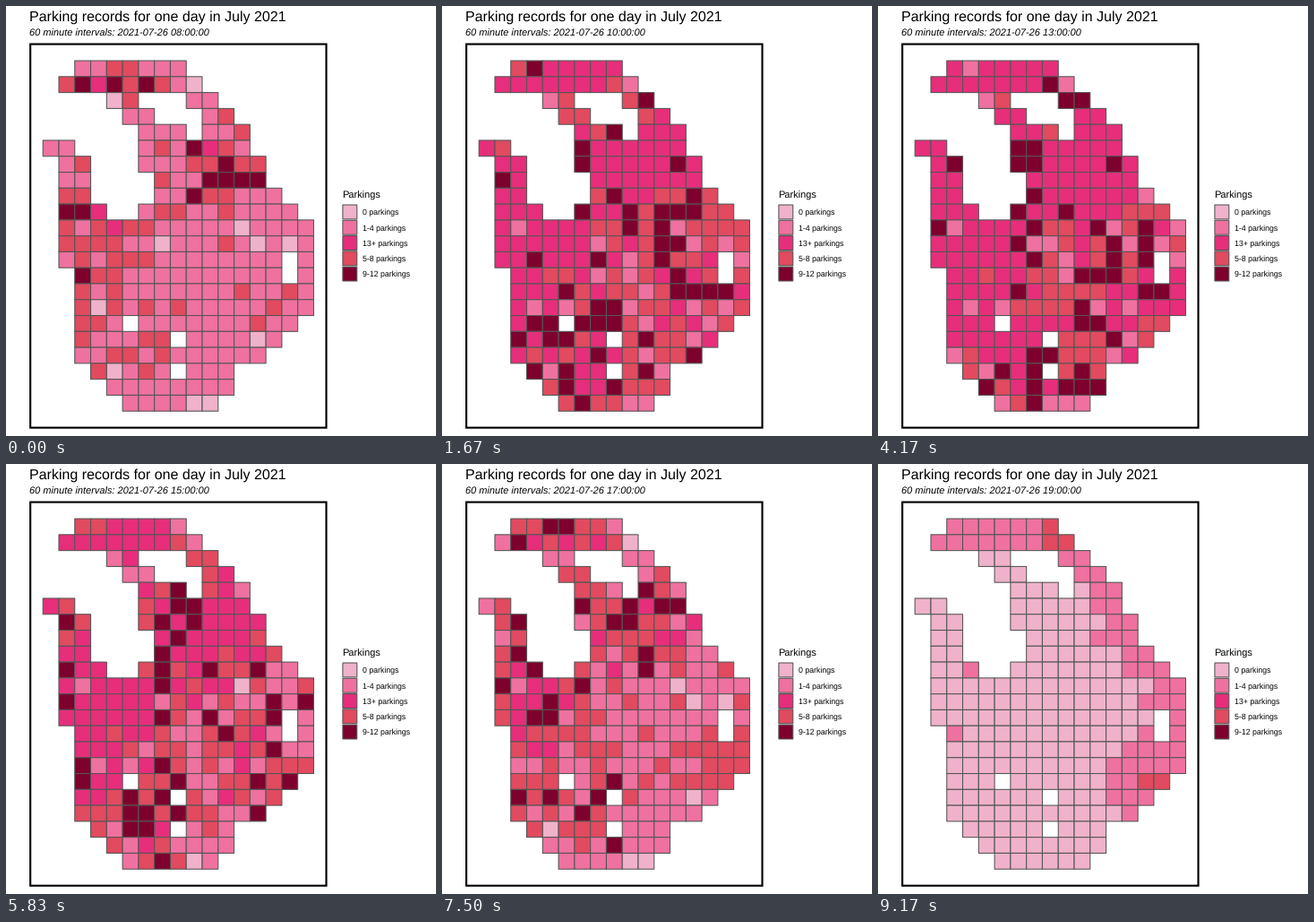
A matplotlib script for the animation above (10000 ms loop, 480x480 px).

```python
import numpy as np
import matplotlib.pyplot as plt
from matplotlib.animation import FuncAnimation
from matplotlib.collections import PatchCollection
from matplotlib.patches import Rectangle

plt.rcParams["font.family"] = ["Liberation Sans"]
plt.rcParams["text.hinting"] = "none"

SIZE, DPI = 480, 100
PX = 72 / DPI
LOOP_MS, TICK_MS = 10000, 25
TICKS = LOOP_MS // TICK_MS
FIRST_HOUR, HOURS = 8, 12

PANEL_X, PANEL_Y, PITCH = 26.1, 41.5, 17.78
COLS, ROWS, MARGIN = 17, 22, 0.05
PANEL_W = COLS * PITCH * (1 + 2 * MARGIN)
PANEL_H = ROWS * PITCH * (1 + 2 * MARGIN)
GRID_LINE, GRID_WIDTH = "#555555", 1.07

COLORS = {
    "0": "#efb2ca",
    "1-4": "#ef719f",
    "13+": "#e62e7b",
    "5-8": "#e14a5f",
    "9-12": "#7d002d",
}
BINS = ["0", "1-4", "5-8", "9-12", "13+"]
LIMITS = [0.5, 4.5, 8.5, 12.5]

LAKES = {(15, 12), (15, 13), (5, 16), (8, 17), (8, 19)}
# Busy areas: column, row, width, height, extra cars.
HOTSPOTS = [(4, 0.5, 3.5, 1.5, 24), (10, 6, 3.5, 3, 23), (2.5, 11, 3.5, 6, 26),
            (13.5, 15, 2.5, 4, 9), (6, 18, 2.5, 3, 9)]


def bump(c, r, center, row, width, height):
    return np.exp(-((c - center) / width) ** 2 - ((r - row) / height) ** 2)


def west_edge(r):
    return np.interp(r, [0, 1, 2, 4, 5, 6, 12, 13, 18, 21],
                     [2, 1, 4, 6, 0, 1, 1, 2, 2, 5])


def east_edge(r):
    return np.round(np.interp(r, [0, 4, 7, 10, 15, 19, 21],
                              [8, 12, 13, 16, 16, 11.4, 10]))


def is_land(c, r):
    channel = ((c - r - 5) / 1.3) ** 2 + ((r - 2.8) / 1.7) ** 2 < 1
    bay_center = min(4.5, 1 + r / 2)
    bay = ((c - bay_center) / 1.8) ** 2 + ((r - 6.5) / 2.9) ** 2 < 1
    inside = west_edge(r) <= c <= east_edge(r)
    return inside and not (channel or bay or (c, r) in LAKES)


cells = np.array([(c, r) for r in range(ROWS) for c in range(COLS) if is_land(c, r)])
cols, rows = cells.T

rng = np.random.default_rng(26)
day = 5 + sum(cars * bump(cols, rows, *area) for *area, cars in HOTSPOTS)
day *= np.exp(rng.normal(0, 0.25, len(cells)))
day[rng.random(len(cells)) < 0.06] *= 0.1  # quiet spots

# After closing time cars remain on the east coast and along the northern tip.
evening = 2 * np.exp(cols - east_edge(rows)) * (rows < 18) + 1.5 * (rows < 2)
evening += 4 * bump(cols, rows, 14, 16, 1.6, 1.6)


def hour_colors(hour):
    cars = day * np.interp(hour, [8, 9, 13, 17, 18, 19], [0.25, 0.95, 1, 0.4, 0.2, 0.01])
    if hour >= 18:
        cars = cars + evening
    noise = np.random.default_rng(hour).normal(0, 0.4, len(cells))
    return [COLORS[BINS[k]] for k in np.digitize(cars * np.exp(noise), LIMITS)]


fig = plt.figure(figsize=(SIZE / DPI, SIZE / DPI), dpi=DPI, facecolor="white")
ax = fig.add_axes([0, 0, 1, 1])
ax.set(xlim=(0, SIZE), ylim=(SIZE, 0))
ax.axis("off")


def label(x, y, text, size, **style):
    return ax.text(x, y, text, fontsize=size * PX, color="black", va="baseline", **style)


def box(x, y, w, h, width, edge, fill="none"):
    ax.add_patch(Rectangle((x, y), w, h, lw=width * PX, ec=edge, fc=fill, snap=False))


label(26.5, 17, "Parking records for one day in July 2021", 16)
subtitle = label(26.1, 34, "", 11, style="italic")

# The frame lies just inside the panel's bounds.
frame = 2.13
box(PANEL_X + frame / 2, PANEL_Y + frame / 2, PANEL_W - frame, PANEL_H - frame,
    frame, "black")

left = PANEL_X + MARGIN * COLS * PITCH
top = PANEL_Y + MARGIN * ROWS * PITCH
tiles = PatchCollection(
    [Rectangle((left + c * PITCH, top + r * PITCH), PITCH, PITCH) for c, r in cells],
    edgecolor=GRID_LINE, linewidth=GRID_WIDTH * PX, snap=False)
ax.add_collection(tiles)

label(375.2, 215, "Parkings", 11)
key, inset = 17.28, 0.7
for k, (name, color) in enumerate(COLORS.items()):
    y = 221.3 + key * k
    box(375.2 + inset, y + inset, key - 2 * inset, key - 2 * inset,
        GRID_WIDTH, GRID_LINE, color)
    label(397.9, y + 12.2, f"{name} parkings", 8.8)


def update(tick):
    hour = FIRST_HOUR + (tick + 1) * HOURS // TICKS % HOURS
    tiles.set_facecolor(hour_colors(hour))
    subtitle.set_text(f"60 minute intervals: 2021-07-26 {hour:02d}:00:00")
    return tiles, subtitle


anim = FuncAnimation(fig, update, frames=TICKS, interval=TICK_MS,
                     repeat=True, repeat_delay=0)
plt.show()
```
